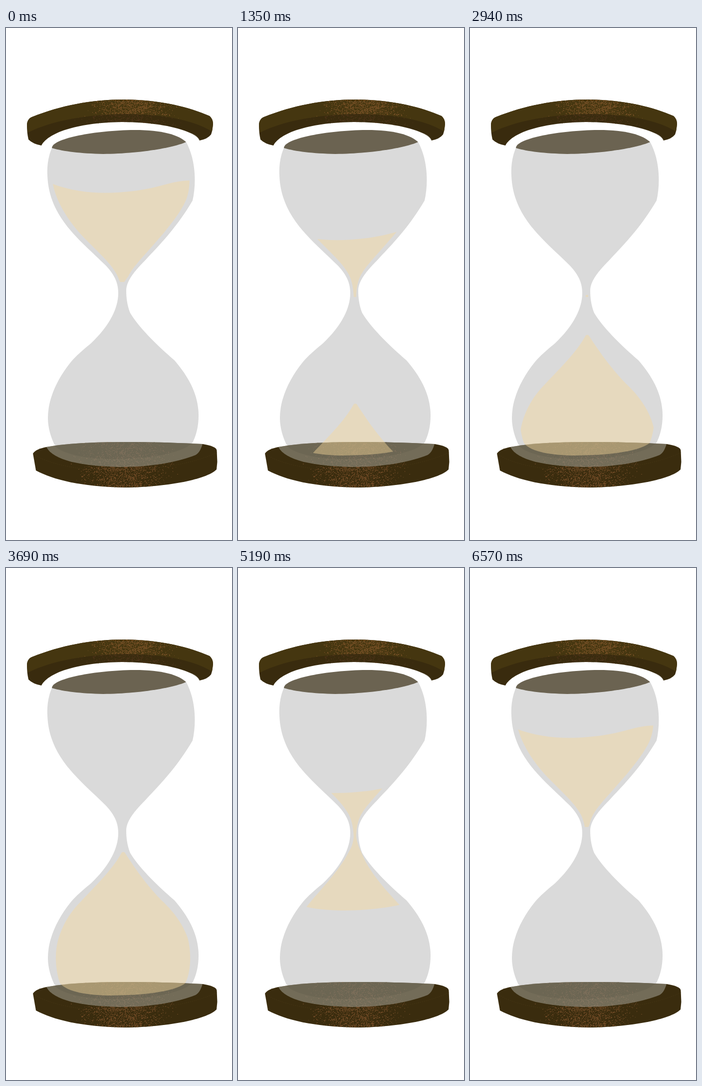
These frames come from a looping animation (453 by 1024 pixels, 7500 ms). An HTML page:

```html
<!DOCTYPE html>
<html lang="en">
<head>
<meta charset="utf-8">
<title>Hourglass</title>
<style>
html, body { margin: 0; width: 100%; height: 100%; overflow: hidden; background: #fff; }
svg { display: block; width: 100%; height: 100%; }
</style>
</head>
<body>
<svg viewBox="0 0 453 1024">
  <defs>
    <path id="lid" d="M42 195C42 186 46 180 52 178C110 155 170 143 238 143C305 144 362 156 408 176Q415 182 415 192Q414 205 411 213Q404 222 388 225Q385 218 374 212C345 197 290 188 232 188C150 189 86 207 71 235Q54 232 45 223Q42 210 42 195Z"/>
    <path id="lidFace" d="M42 195C42 186 46 180 52 178C110 155 170 143 238 143C305 144 362 156 408 176Q415 182 415 192L413 207C370 181 305 172 238 172C165 173 95 184 44 209Z"/>
    <path id="base" d="M54 851C60 843 68 841 81 838C130 829 190 828 250 828C300 828 350 830 394 832C412 835 422 839 422.5 845L423.5 868L422 883C400 905 310 919 235 919C150 917 96 904 60 885Z"/>
    <clipPath id="inLid"><use href="#lid"/></clipPath>
    <clipPath id="inFace"><use href="#lidFace"/></clipPath>
    <clipPath id="inBase"><use href="#base"/></clipPath>
    <clipPath id="inTop">
      <path d="M90 270L94 313C103 355 132 395 160 423L186 449C200 463 212 476 219 488C227 500 231 515 232 538H237C237 518 241 501 250 488C258 475 275 457 289 441L317 409C332 390 344 375 352 361C364 342 368 325 368 300V270Z"/>
    </clipPath>
    <clipPath id="inBottom">
      <path d="M232 538C230 553 227 560 222 568C203 606 165 643 137 678C120 700 108 725 104 742C98 770 98 800 108 830C122 849 170 855 210 855C270 855 338 848 360 830C371 805 372 770 364 738C358 717 345 695 325 675C300 648 263 610 247 568Q240 556 237 538Z"/>
    </clipPath>
  </defs>

  <path fill="#dadada" d="M92 240C84 258 82 278 83 295C86 380 150 425 200 475C216 492 225 508 225 530C225 560 208 595 170 631C153 645 141 655 130 668C100 705 84 745 84 780C84 800 90 818 97 833L120 850H355L372 833C382 815 386 795 386 775C386 735 368 700 338 665C315 645 270 605 249 570C243 555 241 540 241 525C241 500 270 475 285 458C310 432 345 395 374 345C382 310 380 262 361 228Z"/>
  <path fill="#6b6351" d="M92 240C92 222 170 206 250 204C310 203 345 213 361 228C330 242 250 252 195 252C150 251 115 247 92 240Z"/>

  <use href="#lid" fill="#392b0e"/>
  <g clip-path="url(#inLid)"><path id="underSpecks" fill="#4b3218"/></g>
  <use href="#lidFace" fill="#453610"/>
  <g clip-path="url(#inFace)"><path id="lidSpecks" fill="#714d23"/></g>
  <path d="M374 212Q385 217 388 225" fill="none" stroke="#8a8272"/>

  <use href="#base" fill="#3a2c0e"/>
  <path d="M55 852C90 875 150 884 215 885C300 885 380 870 423 849" fill="none" stroke="#4a3a18" stroke-width=".7" stroke-dasharray="2 2"/>
  <g clip-path="url(#inBase)">
    <path id="topSpecks" fill="#5a3d1c"/>
    <path id="baseSpecks" fill="#6a4723"/>
  </g>
  <path fill="#b1b1aa" fill-opacity=".48" d="M81 838C130 829 190 828 250 828C300 828 350 830 394 832C391 842 387 850 380 854C340 870 285 878 228 878C150 876 95 865 81 838Z"/>
  <path fill-opacity=".06" d="M97 835Q170 828 250 828T372 831C350 852 280 862 215 862C160 862 112 852 97 835Z"/>

  <g fill="#f6d899" fill-opacity=".43">
    <g clip-path="url(#inTop)">
      <path id="upper" d="M80 306L94 312C150 333 210 333 270 324C310 318 335 305 372 305V498H244L237 508H229L222 498H80Z"/>
    </g>
    <g clip-path="url(#inBottom)">
      <path id="lower" d="M232 569Q235 567 238 569C258 600 280 632 312 665C345 695 370 735 371 775C371 800 366 827 352 839C335 850 270 860 215 860C175 860 126 855 112 842C104 829 99 815 99 785C99 745 115 702 150 667C190 625 215 600 232 569Z"/>
    </g>
  </g>
</svg>
<script>
const $ = id => document.getElementById(id);

let seed = 7;
const rnd = () => (seed = seed * 16807 % 2147483647) / 2147483647;

// Scatter pixel-sized flecks, densest around column cx
function specks(id, count, cx, spread, top, bottom) {
  let d = "";
  while (count--) {
    const x = Math.round(cx + (rnd() + rnd() + rnd() - 1.5) * spread);
    const y = Math.round(top + rnd() * (bottom - top));
    const w = rnd() < .6 ? 1 : 2, h = rnd() < .7 ? 1 : 2;
    d += `M${x} ${y}h${w}v${h}h-${w}z`;
  }
  $(id).setAttribute("d", d);
}
specks("underSpecks", 500, 240, 80, 168, 195);
specks("lidSpecks", 1400, 252, 72, 142, 182);
specks("topSpecks", 1000, 240, 80, 828, 884);
specks("baseSpecks", 1200, 237, 76, 876, 920);

const shift = (id, y) => $(id).setAttribute("transform", `translate(0 ${y.toFixed(2)})`);

function draw(now) {
  const t = Math.min(Math.floor(now % 7500 / 30) * 30, 6570) / 1000;
  if (t < 3.69) { // sand runs down
    shift("upper", 70 * t);
    shift("lower", Math.max(0, 300 - 86.5 * t));
  } else { // sand flows back up
    shift("upper", 10 + 80 * (6.57 - t));
    shift("lower", -116.7 * (t - 3.69));
  }
  requestAnimationFrame(draw);
}
draw(0);
</script>
</body>
</html>
```
